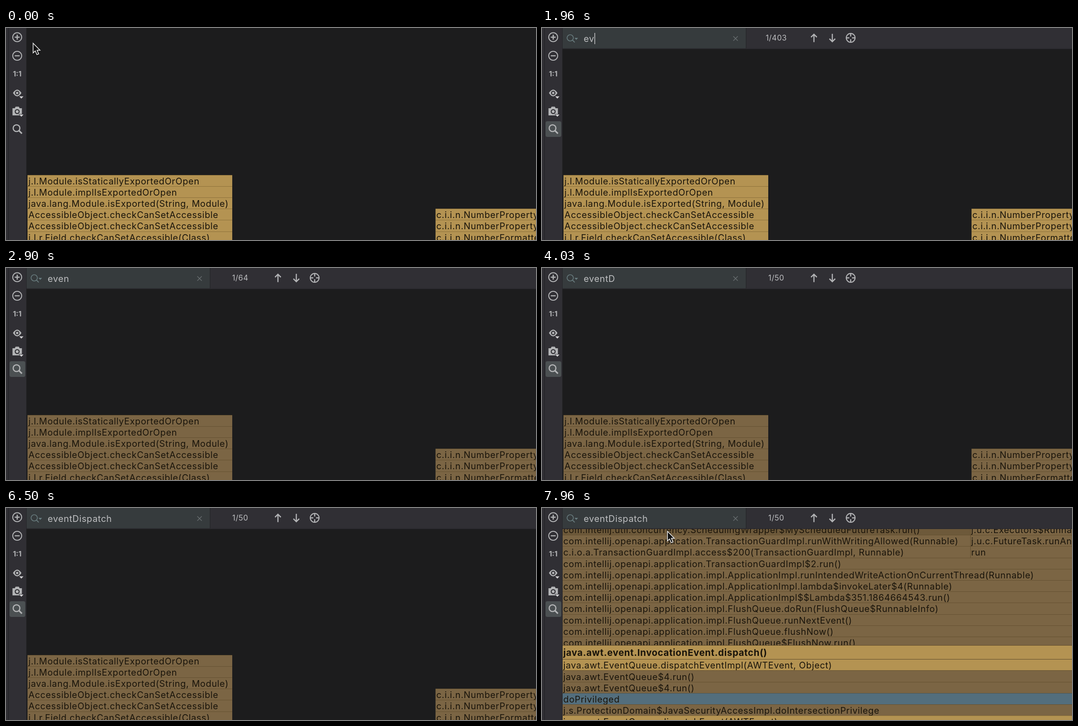
An HTML page with a canvas for the animation above (8 s loop, 1183 by 473 pixels).

```html
<!DOCTYPE html>
<html lang="en">
<head>
<meta charset="utf-8">
<title>Flame graph search</title>
<style>
  html, body { margin: 0; width: 100%; height: 100%; overflow: hidden; background: #1c1c1d; }
  canvas { display: block; }
</style>
</head>
<body>
<canvas id="stage" width="1183" height="473"></canvas>
<script>
const ctx = document.getElementById('stage').getContext('2d');
const W = 1183, H = 473, LOOP = 8000, ROW = 25.2;
const GOLD = '#b49352', DIM = '#7b6544', BLUE = '#536e7d', ICON = '#b3b4b6';

const QUERY = 'eventDispatch';
const KEYS = [1030, 1960, 2200, 2400, 3060, 3530, 4200, 4330, 5160, 5330, 5560, 5730, 6000];
const COUNTS = [[0, '0 results'], [1300, '1/403'], [2300, '1/64'], [3830, '1/50']];

const LEFT_STACK = [
  'j.l.Module.isStaticallyExportedOrOpen',
  'j.l.Module.implIsExportedOrOpen',
  'java.lang.Module.isExported(String, Module)',
  'AccessibleObject.checkCanSetAccessible',
  'AccessibleObject.checkCanSetAccessible',
  'j.l.r.Field.checkCanSetAccessible(Class)'
];
const RIGHT_STACK = [
  'c.i.i.n.NumberPropertyFormat', 'c.i.i.n.NumberPropertyFormat', 'c.i.i.n.NumberFormatter.format'
];
const APP = 'com.intellij.openapi.application.';
const CALLS = [
  'com.intellij.util.concurrency.SchedulingWrapper$MyScheduledFutureTask.run()',
  APP + 'TransactionGuardImpl.runWithWritingAllowed(Runnable)',
  'c.i.o.a.TransactionGuardImpl.access$200(TransactionGuardImpl, Runnable)',
  APP + 'TransactionGuardImpl$2.run()',
  APP + 'impl.ApplicationImpl.runIntendedWriteActionOnCurrentThread(Runnable)',
  APP + 'impl.ApplicationImpl.lambda$invokeLater$4(Runnable)',
  APP + 'impl.ApplicationImpl$$Lambda$351.1864664543.run()',
  APP + 'impl.FlushQueue.doRun(FlushQueue$RunnableInfo)',
  APP + 'impl.FlushQueue.runNextEvent()',
  APP + 'impl.FlushQueue.flushNow()',
  APP + 'impl.FlushQueue$FlushNow.run()',
  '',
  'java.awt.EventQueue.dispatchEventImpl(AWTEvent, Object)',
  'java.awt.EventQueue$4.run()',
  'java.awt.EventQueue$4.run()',
  'doPrivileged',
  'j.s.ProtectionDomain$JavaSecurityAccessImpl.doIntersectionPrivilege',
  'java.awt.EventQueue.dispatchEvent(AWTEvent)'
];
const CALL_FILLS = { 12: GOLD, 15: BLUE, 17: GOLD };
const SIDE_CALLS = ['j.u.c.Executors$RunnableAdapter.call()', 'j.u.c.FutureTask.runAndReset()', 'run'];

function rect(x, y, w, h, color) {
  ctx.fillStyle = color;
  ctx.fillRect(x, y, w, h);
}

function text(str, x, y, color, { size = 20, weight = 400, gap = 0.64, align = 'left' } = {}) {
  ctx.font = `${weight} ${size}px Inter, sans-serif`;
  ctx.letterSpacing = gap + 'px';
  ctx.textAlign = align;
  ctx.fillStyle = color;
  ctx.fillText(str, x, y);
}

function shape(path, { stroke, fill, width = 2 } = {}) {
  const p = new Path2D(path);
  if (fill) { ctx.fillStyle = fill; ctx.fill(p, 'evenodd'); }
  if (stroke) { ctx.strokeStyle = stroke; ctx.lineWidth = width; ctx.stroke(p); }
}

const circle = (x, y, r) => `M${x - r} ${y}a${r} ${r} 0 1 0 ${2 * r} 0a${r} ${r} 0 1 0 ${-2 * r} 0z`;

function cell(str, x, y, w, fill) {
  const top = Math.floor(y), h = Math.floor(y + ROW) - top;
  ctx.save();
  ctx.beginPath();
  ctx.rect(x, top, w, h);
  ctx.clip();
  rect(x, top, w, h, fill);
  rect(x, top, w, 1, 'rgba(50,35,5,.3)');
  text(str, x + 2, y + 20.5, '#19140b');
  ctx.restore();
}

function drawStacks(fill) {
  LEFT_STACK.forEach((name, i) => cell(name, 48, 328 + i * ROW, 457, fill));
  RIGHT_STACK.forEach((name, i) => cell(name, 958.5, 403.7 + i * ROW, 225, fill));
}

function drawCalls(hovered) {
  CALLS.forEach((name, i) => {
    const y = 35.4 + i * ROW, split = i < SIDE_CALLS.length;
    cell(name, 45.5, y, split ? 910.5 : W, CALL_FILLS[i] || DIM);
    if (split) {
      cell(SIDE_CALLS[i], 956, y, 228, DIM);
      rect(956, y, 1, ROW, 'rgba(50,35,5,.35)');
    }
  });
  if (hovered) rect(45, 46, 911, 14, 'rgba(40,25,10,.16)');
  rect(45, 306, W, 32, '#5f4c2b');
  rect(45, 307, W, 30, GOLD);
  text('java.awt.event.InvocationEvent.dispatch()', 47.5, 329.7, '#19140b', { size: 20.6, weight: 700, gap: 0.66 });
}

function drawSidebar(active) {
  rect(0, 0, 45, H, '#302f34');
  rect(5, 0, 1, H, '#1f1f22');
  rect(45, 0, 1, H, '#242427');
  if (active) {
    ctx.beginPath();
    ctx.roundRect(8, 208, 35, 35, 4);
    ctx.fillStyle = '#4b5052';
    ctx.fill();
  }
  const line = { stroke: ICON };
  shape(circle(25, 20.5, 10), line);
  shape('M19.5 20.5h11M25 15v11', { stroke: ICON, width: 2.6 });
  shape(circle(25, 62, 10), line);
  shape('M19.5 62h11', { stroke: ICON, width: 2.4 });
  text('1:1', 25, 108, ICON, { size: 16, weight: 700, gap: 0, align: 'center' });
  shape('M15.5 145Q25 130 34.5 145Q25 160 15.5 145z' + circle(25, 145, 5), { fill: ICON });
  shape(circle(25, 145, 2.7), { fill: ICON });
  shape('M14.5 179h5l2-3.5h7l2 3.5h5v16h-21z' + circle(25, 186.5, 5.5), { fill: ICON });
  shape(circle(25, 186.5, 3.2), { fill: ICON });
  for (const y of [152.5, 193]) {
    shape(`M28 ${y - 1}h12l-6 7z`, { fill: '#302f34' });
    shape(`M29.5 ${y}h9.5l-4.75 5z`, { fill: '#d0d0d2' });
  }
  shape(circle(23.5, 223.5, 7.5), { stroke: ICON, width: 2.6 });
  shape('M29 229l6.5 6.5', { stroke: ICON, width: 3.2 });
}

function drawToolbar(typed, caret, count, enabled) {
  rect(46, 0, W, 47, '#302f34');
  rect(46, 0, 409, 45, '#363b3d');
  rect(455, 0, 1, 46, '#222225');
  rect(46, 45.5, W, 1, '#29292c');
  const hint = '#687b7e';
  shape(circle(63, 22, 7), { stroke: hint, width: 1.7 });
  shape('M68 27l5 5', { stroke: hint, width: 1.8 });
  shape('M72.5 22h8l-4 4.5z', { fill: hint });

  text(typed, 93, 31, '#bdbec0');
  if (caret) rect(Math.round(93 + (typed ? ctx.measureText(typed).width : 0)), 11, 1.5, 25, '#c9cacc');
  if (typed) shape('M427 18.5l10 10m0-10l-10 10', { stroke: '#686e70', width: 1.5 });

  text(count, 522.8, 28.2, '#bdbec0', { size: 17, gap: 0.4, align: 'center' });
  const stroke = enabled ? ICON : '#525357';
  shape('M607 31.5v-17M600.5 20.5l6.5-6.5 6.5 6.5', { stroke, width: 2.5 });
  shape('M648 13v17M641.5 24l6.5 6.5 6.5-6.5', { stroke, width: 2.5 });
  shape(circle(689, 22, 9.8), { stroke, width: 2.2 });
  shape('M689 12v7M689 25v7M679 22h7M692 22h7', { stroke, width: 2.4 });
}

function drawArrow(x, y) {
  ctx.save();
  ctx.translate(x, y);
  ctx.shadowColor = 'rgba(0,0,0,.45)';
  ctx.shadowBlur = 3;
  ctx.shadowOffsetY = 2;
  shape('M0 0v21.5l4.8-4.3 3.7 8.3 4-1.7-3.6-8.1h6.6z', { fill: '#111', stroke: '#e4e4e4', width: 1.7 });
  ctx.restore();
}

function drawIBeam(x, y) {
  const beam = `M${x - 6} ${y - 10}q5 0 6 3q1-3 6-3M${x} ${y - 7}v14M${x - 6} ${y + 10}q5 0 6-3q1 3 6 3M${x - 3} ${y + 2}h6`;
  shape(beam, { stroke: '#e6e6e6', width: 4 });
  shape(beam, { stroke: '#222', width: 1.6 });
}

function caretVisible(t, lastKey) {
  return Math.floor((t - lastKey) / 500) % 2 === 0;
}

function drawPointer(t) {
  if (t < 1000) drawArrow(60.5, 34);
  else if (t < 1300) drawIBeam(62, 36);
  else if (t >= 7730) {
    const k = Math.min(1, Math.floor((t - 7730) / 38) / 6);
    const x = 62 + 218 * k, y = 34 + 18 * k;
    if (y < 46) drawIBeam(x, y); else drawArrow(x, y);
  }
}

function draw(t) {
  rect(0, 0, W, H, '#1c1c1d');
  if (t < 6830) drawStacks(t < 2000 ? GOLD : DIM);
  else drawCalls(t >= 7880);
  drawSidebar(t >= 1300);
  if (t >= 1000) {
    const pressed = KEYS.filter(k => k <= t);
    const count = COUNTS.findLast(([from]) => from <= t)[1];
    drawToolbar(QUERY.slice(0, pressed.length), caretVisible(t, pressed.at(-1) ?? 1000), count, t >= 1300);
  }
  drawPointer(t);
}

const start = performance.now();
function tick() {
  draw((performance.now() - start) % LOOP);
  requestAnimationFrame(tick);
}
tick();
</script>
</body>
</html>
```
